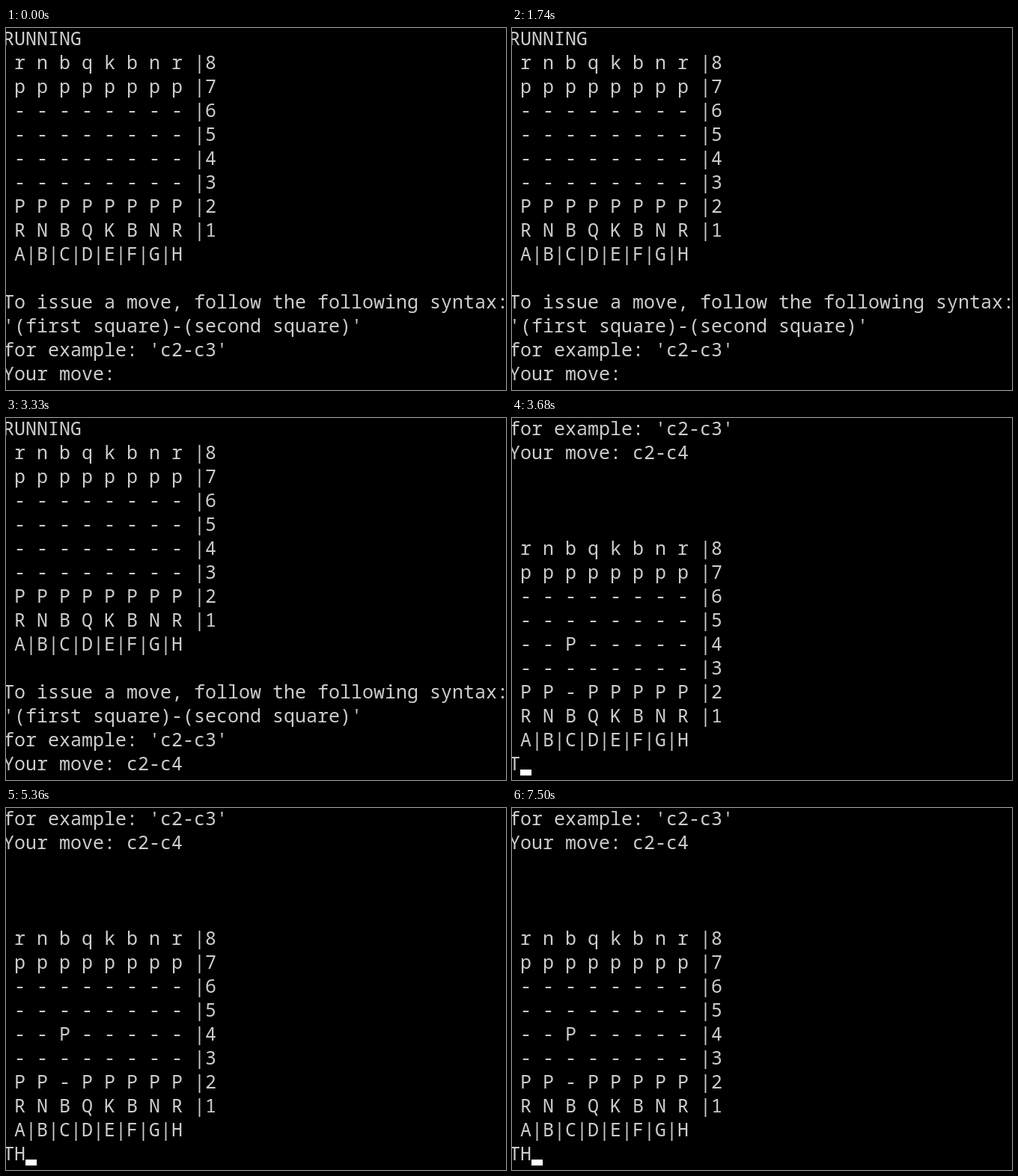
An HTML page with a canvas that plays this animation: 668 by 484 pixels, repeating every 8 s.

```html
<!DOCTYPE html>
<html lang="en">
<head>
<meta charset="utf-8">
<title>Console chess</title>
<style>
  html, body { margin: 0; width: 100%; height: 100%; overflow: hidden; background: #000; }
  canvas { display: block; }
</style>
</head>
<body>
<canvas id="screen" width="668" height="484"></canvas>
<script>
const ctx = document.getElementById('screen').getContext('2d', { alpha: false });
const LOOP = 8000;
const CELL_W = 15, CELL_H = 32;
const LEFT = -4, BASELINE = 23, LAST_ROW = 14;

const spaced = s => ' ' + [...s].join(' ');

function board(ranks) {
  const rows = ranks.map((rank, i) => `${spaced(rank)} |${8 - i}`);
  return [...rows, ' ' + [...'ABCDEFGH'].join('|')];
}

const empty = '--------';
const example = "for example: 'c2-c3'";
const prompt = 'Your move: ';

const before = [
  'RUNNING',
  ...board(['rnbqkbnr', 'pppppppp', empty, empty, empty, empty, 'PPPPPPPP', 'RNBQKBNR']),
  '',
  'To issue a move, follow the following syntax:',
  "'(first square)-(second square)'",
  example
];

const after = [
  example,
  prompt + 'c2-c4',
  '', '', '',
  ...board(['rnbqkbnr', 'pppppppp', empty, empty, '--P-----', empty, 'PP-PPPPP', 'RNBQKBNR'])
];

// start time, lines above, input line, cursor visible
const steps = [
  [0, before, prompt, false],
  [1180, before, prompt, true],
  [1740, before, prompt, false],
  [2210, before, prompt + 'c', false],
  [2300, before, prompt + 'c', true],
  [2380, before, prompt + 'c2', true],
  [2770, before, prompt + 'c2-', false],
  [2950, before, prompt + 'c2-c', true],
  [3130, before, prompt + 'c2-c4', true],
  [3330, before, prompt + 'c2-c4', false],
  [3680, after, 'T', true],
  [4340, after, 'T', false],
  [4890, after, 'T', true],
  [5360, after, 'TH', true],
  [5920, after, 'TH', false],
  [6480, after, 'TH', true],
  [7040, after, 'TH', false],
  [7500, after, 'TH', true]
];

function drawLine(text, row) {
  [...text].forEach((ch, col) => {
    ctx.fillText(ch, LEFT + col * CELL_W, BASELINE + row * CELL_H);
  });
}

function draw(t) {
  const [, lines, input, cursor] = steps.findLast(step => step[0] <= t);
  ctx.fillStyle = '#000';
  ctx.fillRect(0, 0, 668, 484);
  ctx.font = '25px "Noto Sans Mono", "DejaVu Sans Mono", monospace';
  ctx.fillStyle = '#ccc';
  lines.forEach(drawLine);
  drawLine(input, LAST_ROW);
  if (cursor) {
    ctx.fillStyle = '#fff';
    ctx.fillRect(LEFT + input.length * CELL_W, 470, CELL_W, 8);
  }
}

const start = performance.now();

function tick() {
  draw((performance.now() - start) % LOOP);
  requestAnimationFrame(tick);
}
tick();
</script>
</body>
</html>
```
